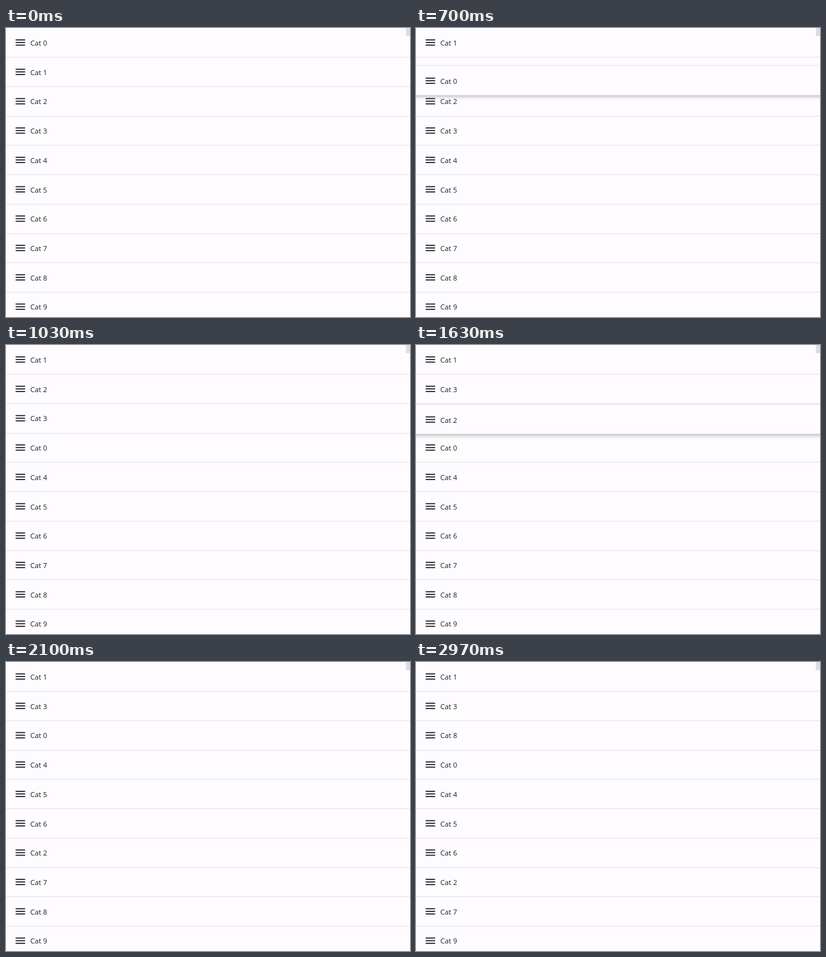
An HTML page with a canvas that plays this animation: 640x460 px, repeating every 3430 ms.

```html
<!DOCTYPE html>
<html lang="en">
<head>
<meta charset="utf-8">
<title>Reorderable list</title>
<style>
  html, body { margin: 0; width: 100%; height: 100%; overflow: hidden; background: #fefcff; }
  canvas { display: block; }
</style>
</head>
<body>
<canvas id="stage" width="640" height="460"></canvas>
<script>
const ctx = document.getElementById("stage").getContext("2d");
const W = 640, H = 460, LOOP = 3430;
const ROW = 46.72, SLIDE = 45;
const SURFACE = "#fefcff", INK = "#1b1b1f", LINE = "#e4e2e7", THUMB = "#dedce0";

// Each drag: slots it connects and [time, card top] points
const drags = [
  { from: 0, to: 3, path: [[530, 22], [740, 70], [800, 108], [830, 136], [900, 146], [980, 146], [1030, 140.2]] },
  { from: 1, to: 6, path: [[1530, 51], [1630, 95.5], [1910, 274], [1960, 286], [2000, 286], [2030, 280.3]] },
  { from: 8, to: 2, path: [[2530, 362], [2670, 274], [2830, 130], [2900, 79], [2940, 79], [2970, 93.4]] }
];

let order = Array.from({ length: 10 }, (_, i) => i);
for (const d of drags) {
  d.start = d.path[0][0];
  d.end = d.path[d.path.length - 1][0];
  d.before = order;
  order = order.slice();
  order.splice(d.to, 0, order.splice(d.from, 1)[0]);
  d.after = order;
}

function cardTop(path, t) {
  if (t <= path[0][0]) return path[0][1];
  const i = path.findIndex(p => p[0] >= t);
  const [t0, y0] = path[i - 1], [t1, y1] = path[i];
  return y0 + (y1 - y0) * (t - t0) / (t1 - t0);
}

// Rows make room once the card passes their middle; averaging recent time makes the slide
function rowShift(drag, slot, t) {
  const samples = 15;
  let sum = 0;
  for (let i = 0; i < samples; i++) {
    const y = cardTop(drag.path, t - SLIDE * i / samples) / ROW;
    if (slot > drag.from && y > slot - 0.5) sum--;
    if (slot < drag.from && y < slot + 0.5) sum++;
  }
  return sum / samples * ROW;
}

function drawContent(item, top) {
  ctx.fillStyle = INK;
  for (let i = 0; i < 3; i++) ctx.fillRect(15.3, top + 18.1 + i * 4.17, 15, 1.67);
  ctx.font = '11.2px "Open Sans", "Noto Sans", sans-serif';
  ctx.textBaseline = "alphabetic";
  ctx.fillText("Cat " + item, 38.5, Math.round(top + 28));
}

function drawRow(item, top) {
  ctx.fillStyle = LINE;
  ctx.fillRect(0, Math.floor(top + ROW), W, 1);
  drawContent(item, top);
}

function drawCard(item, top) {
  ctx.save();
  ctx.shadowColor = "rgba(0, 0, 0, 0.32)";
  ctx.shadowBlur = 7;
  ctx.shadowOffsetY = 2.5;
  ctx.fillStyle = SURFACE;
  ctx.fillRect(-20, top, W + 40, ROW - 0.7);
  ctx.restore();
  drawContent(item, top);
}

function draw(t) {
  ctx.fillStyle = SURFACE;
  ctx.fillRect(0, 0, W, H);
  const drag = drags.find(d => t >= d.start && t < d.end);
  if (drag) {
    drag.before.forEach((item, slot) => {
      if (slot !== drag.from) drawRow(item, slot * ROW + rowShift(drag, slot, t));
    });
    drawCard(drag.before[drag.from], cardTop(drag.path, t));
  } else {
    const past = drags.filter(d => t >= d.end).pop();
    (past ? past.after : drags[0].before).forEach((item, slot) => drawRow(item, slot * ROW));
  }
  ctx.fillStyle = THUMB;
  ctx.fillRect(633.5, 0, 6.5, 13);
}

// The picture advances at 30 steps per second, on a 10 ms clock
function steppedTime(t) {
  const step = Math.floor((t + 3.4) * 0.03);
  return Math.round(step * 10 / 3) * 10;
}

const origin = performance.now();
function tick() {
  draw(steppedTime((performance.now() - origin) % LOOP));
  requestAnimationFrame(tick);
}
tick();
</script>
</body>
</html>
```
